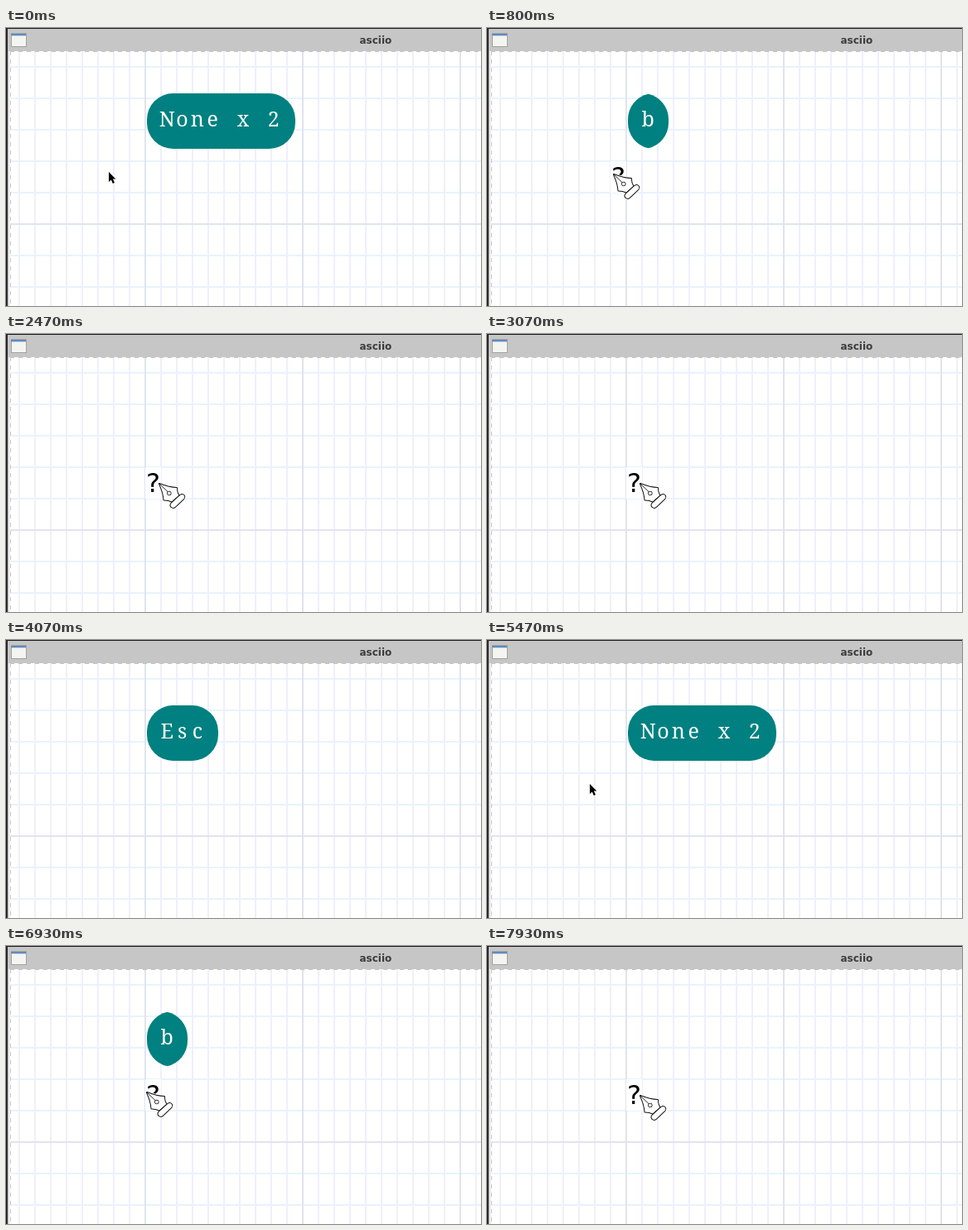
Write an HTML page with a canvas that moves like this. It is 573 px wide and 336 px high and loops after 8000 ms.

```html
<!DOCTYPE html>
<html lang="en">
<head>
<meta charset="utf-8">
<title>asciio</title>
<style>
html, body { margin: 0; width: 100%; height: 100%; overflow: hidden; background: #fff; }
canvas { display: block; }
</style>
</head>
<body>
<canvas id="stage" width="573" height="336"></canvas>
<script>
const W = 573, H = 336, LOOP = 8000, CYCLE = 5460;
const CELL_W = 19, CELL_H = 38, GRID_X = 168, GRID_Y = 237;
const ctx = document.getElementById('stage').getContext('2d');

// Key captions: start, end, text, width
const KEYS = [
  [0, 500, 'None x 2', 179],
  [500, 2100, 'b', 49],
  [3200, 4700, 'Esc', 86],
  [4700, CYCLE, 'None x 2', 179]
];

// Pointer stages, each a path of [time, x, y]
const ARROW_IN = [[4800, 88, 178], [5250, 124, 174], [CYCLE, 124, 174]];
const ARROW_OUT = [[0, 124, 174], [200, 124, 174], [500, 136, 176]];
const PEN = [[500, 136, 176], [940, 161, 178], [1330, 167, 176], [2200, 185, 181], [3200, 185, 181]];

function along(path, t) {
  let i = 1;
  while (i < path.length - 1 && t > path[i][0]) i++;
  const [t0, x0, y0] = path[i - 1], [t1, x1, y1] = path[i];
  const k = Math.min(1, Math.max(0, (t - t0) / (t1 - t0)));
  return [Math.round(x0 + (x1 - x0) * k), Math.round(y0 + (y1 - y0) * k)];
}

function box(color, x, y, w, h) {
  ctx.fillStyle = color;
  ctx.fillRect(x, y, w, h);
}

function drawGrid() {
  box('#fff', 3, 28, W, H);
  for (let y = GRID_Y - 5 * CELL_H; y < H; y += CELL_H) box('#e8f3ff', 5, y - 1, W, 2);
  for (let x = GRID_X - 8 * CELL_W; x < W; x += CELL_W) box('#f0effd', x - 1, 28, 2, H);
  for (let x = GRID_X; x < W; x += 10 * CELL_W) box('#e0e4ee', x - 1, 28, 2, H);
  box('#e0e4ee', 5, GRID_Y - 1, W, 2);
  for (let x = 5; x < W; x += 10) box('#c4c4c4', x, 28, 5, 1);
  for (let y = 28; y < H; y += 10) box('#c4c4c4', 5, y, 1, 5);
}

function drawFrame() {
  box('#c6c6c6', 2, 1, W, 27);
  box('#1c1a1c', 0, 0, W, 1);
  box('#2a282a', 0, 0, 2, H);
  box('#d6d6d6', 2, 28, 2, H);

  box('#a2a2a0', 6, 6, 19, 17);
  box('#f4f4f0', 7, 7, 17, 15);
  box('#5f8cbc', 6, 7, 18, 2);
  box('#c4d6e8', 7, 9, 17, 1);

  ctx.fillStyle = '#3c3c3c';
  ctx.font = 'bold 12px "DejaVu Sans", sans-serif';
  ctx.textAlign = 'left';
  ctx.fillText('asciio', 426.5, 19);
}

// Round corners that meet in a point when the plate is narrower than two radii
function plate(x, y, w, h, r) {
  const turn = Math.acos(Math.max(0, r - w / 2) / r);
  const left = x + r, right = x + w - r, top = y + r, bottom = y + h - r;
  ctx.beginPath();
  ctx.arc(left, top, r, Math.PI, Math.PI + turn);
  ctx.arc(right, top, r, -turn, 0);
  ctx.arc(right, bottom, r, 0, turn);
  ctx.arc(left, bottom, r, Math.PI - turn, Math.PI);
  ctx.fill();
}

function drawKey(text, w) {
  ctx.fillStyle = '#008080';
  plate(170, 79, w, 67, 31.5);
  // Fixed-pitch caption
  ctx.fillStyle = '#fff';
  ctx.font = '300 25px "Noto Serif", serif';
  ctx.textAlign = 'center';
  [...text].forEach((c, i) => ctx.fillText(c, 194.2 + i * 18.36, 118.6));
}

function outline(path, x, y, fill, stroke, width) {
  ctx.save();
  ctx.translate(x, y);
  ctx.lineJoin = 'round';
  ctx.lineWidth = width;
  ctx.strokeStyle = stroke;
  ctx.fillStyle = fill;
  ctx.stroke(path);
  ctx.fill(path);
  ctx.restore();
}

const arrow = new Path2D('M0 0V12L2.8 9.4L4.9 14L7 13L4.9 8.6H8.4Z');
const nib = new Path2D('M0 0Q12 5 21 5Q21 11 23.5 14L15 21.5Q11 19.5 5.5 19.5Q5 11 0 0Z');
const holder = new Path2D('M14.5 23.5L25 14Q28 12 30 14.5Q31 16.5 29.5 18L19.5 27.5Q17 30 14.5 28Q12.5 26 14.5 23.5Z');
const slit = new Path2D('M0 0L10.5 10');
const hole = new Path2D('M13.7 11.5A1.9 1.9 0 1 1 9.9 11.5A1.9 1.9 0 1 1 13.7 11.5Z');

function drawPen(x, y) {
  const left = GRID_X + Math.floor((x - GRID_X) / CELL_W) * CELL_W;
  box('#fff', left, GRID_Y - 2 * CELL_H, CELL_W, CELL_H);
  ctx.fillStyle = '#000';
  ctx.font = '32px "DejaVu Sans Mono", monospace';
  ctx.textAlign = 'center';
  ctx.fillText('?', left + CELL_W / 2 - 0.3, 191.3);

  for (const part of [nib, holder]) outline(part, x, y, '#fff', '#fff', 4);
  for (const part of [nib, holder]) outline(part, x, y, '#fff', '#111', 2);
  outline(slit, x, y, '#111', '#111', 0.9);
  outline(hole, x, y, '#fff', '#111', 1.6);
}

function drawArrow(x, y) {
  outline(arrow, x, y, '#000', '#fff', 2);
}

function render(time) {
  const t = (time % LOOP) % CYCLE;
  drawGrid();
  drawFrame();
  const key = KEYS.find(([start, end]) => t >= start && t < end);
  if (key) drawKey(key[2], key[3]);
  if (t < 500) drawArrow(...along(ARROW_OUT, t));
  else if (t < 3200) drawPen(...along(PEN, t));
  else if (t >= 4800) drawArrow(...along(ARROW_IN, t));
}

const begin = performance.now();
function tick() {
  render(performance.now() - begin);
  requestAnimationFrame(tick);
}
tick();
</script>
</body>
</html>
```
